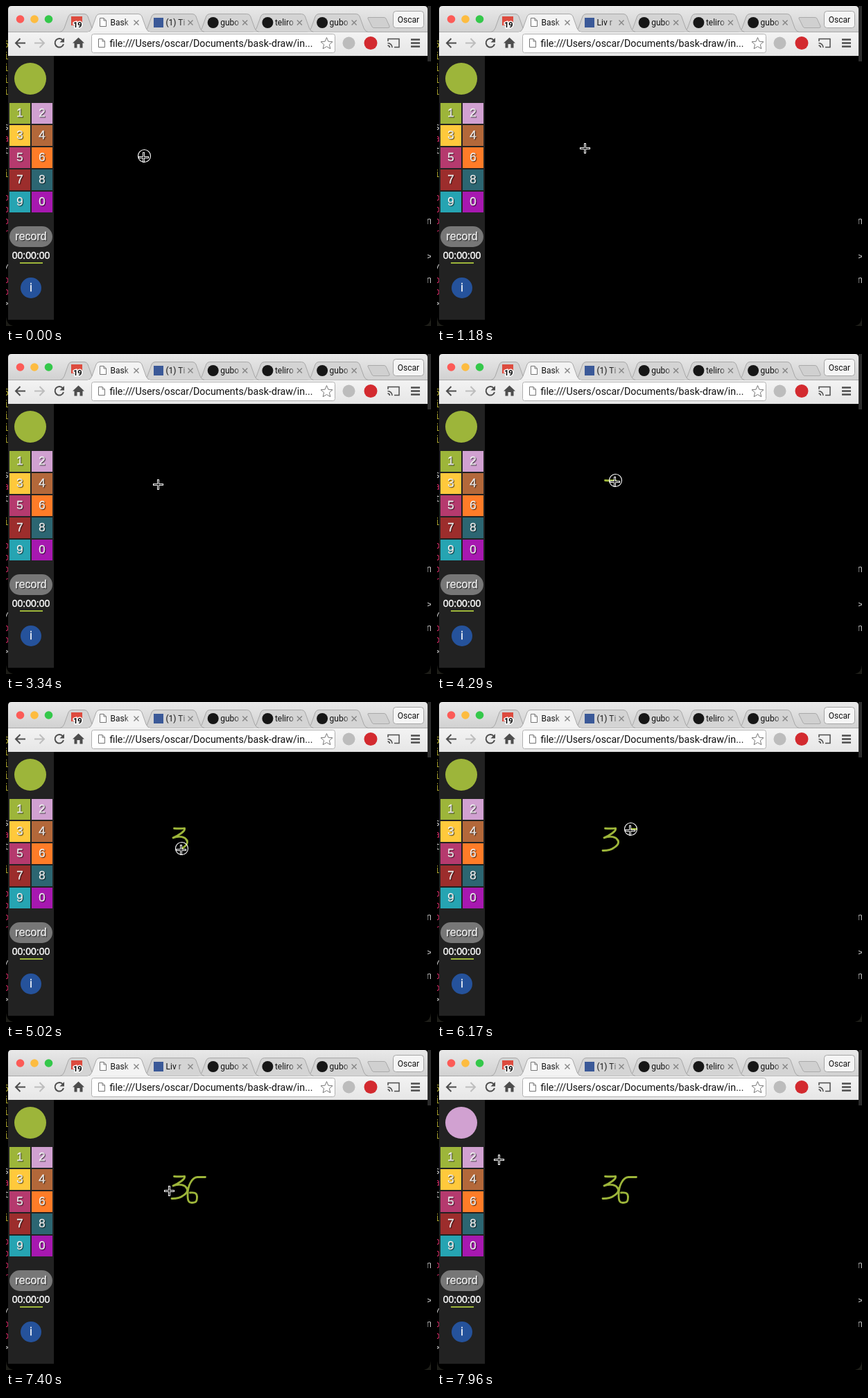
An HTML page for the animation above (7990 ms loop, 613 px wide and 462 px high).

```html
<!DOCTYPE html>
<html lang="en">
<head>
<meta charset="utf-8">
<title>Drawing board</title>
<style>
  html, body { margin: 0; width: 100%; height: 100%; overflow: hidden; background: #000; }
  svg { display: block; width: 613px; height: 462px; }
  text { font-family: Roboto, "Open Sans", sans-serif; }
  .title { font-size: 12px; fill: url(#fade); }
  .side text { font-family: "Liberation Sans", Arial, sans-serif; fill: #fff; stroke: #fff; stroke-width: .4; text-anchor: middle; }
  .shade { text-shadow: 1px 1px 1px rgba(0, 0, 0, .6); }
  .code text { font: 14px "DejaVu Sans Mono", monospace; }
  .icon { fill: none; stroke: #4d4d4d; stroke-width: 2; }
</style>
</head>
<body>
<svg viewBox="0 0 613 462">
  <defs>
    <linearGradient id="bar" x2="0" y2="1"><stop stop-color="#e9e9e9"/><stop offset="1" stop-color="#d0d0d0"/></linearGradient>
    <linearGradient id="tool" x2="0" y2="1"><stop stop-color="#f3f3f3"/><stop offset="1" stop-color="#e6e6e6"/></linearGradient>
    <linearGradient id="fade"><stop offset=".7" stop-color="#111"/><stop offset="1" stop-color="#111" stop-opacity=".4"/></linearGradient>
    <clipPath id="edge"><path d="M0 40H3V453H0ZM608 80H613V453H608Z"/></clipPath>
    <path id="page" d="M.5 .5H6L9.500 4V12.500H.5ZM6 .5V4H9.500" fill="#fff" stroke="#757575"/>
  </defs>

  <g class="code" id="code" clip-path="url(#edge)"></g>
  <path d="M608 0H613V80H608Z" fill="#2c2c2c"/>
  <path d="M0 449Q1 460 10 462H0ZM613 449Q612 460 603 462H613Z" fill="#1d1d18"/>

  <!-- browser window -->
  <path d="M3 39V5Q3 0 8 0H603Q608 0 608 5V39Z" fill="url(#bar)"/>
  <circle cx="20.500" cy="19" r="5.800" fill="#fc5b57"/>
  <circle cx="41" cy="19" r="5.800" fill="#fdbc40"/>
  <circle cx="61.500" cy="19" r="5.800" fill="#34c84a"/>
  <path d="M3 37.500H608V72H3Z" fill="url(#tool)"/>
  <path d="M3 37.500H608" stroke="#a8a8a8"/>
  <g id="tabs"></g>
  <path d="M523 16.500H545Q547 16.500 548 18L553 29Q554 31.500 551 31.500H531Q529 31.500 528 30L522 18Q521.500 16.500 523 16.500Z" fill="#d0d0d0" stroke="#aaa"/>
  <rect x="94" y="15" width="16" height="13" fill="#dd4b3e"/>
  <text x="97" y="31" font-size="11" font-weight="700" stroke="#fff" stroke-width="3" paint-order="stroke">19</text>
  <use href="#page" x="135" y="17"/>
  <rect x="558.500" y="7.500" width="44" height="24" rx="4" fill="#f5f5f5" stroke="#a5a5a5"/>
  <text x="580.500" y="24" font-size="12" text-anchor="middle" fill="#111">Oscar</text>

  <!-- toolbar -->
  <path class="icon" d="M28 53.500H14.500M20.500 47L14 53.500L20.500 60"/>
  <path class="icon" d="M41 53.500H54.500M48.500 47L55 53.500L48.500 60" style="stroke:#bdbdbd"/>
  <path class="icon" d="M82 49.500A6.300 6.300 0 1 0 83 55"/>
  <path d="M84 46V52.500H77.500Z" fill="#4d4d4d"/>
  <path d="M104.500 45.500L113 53.500H110.500V60.500H106.500V55H102.500V60.500H98.500V53.500H96Z" fill="#4d4d4d"/>
  <rect x="123.500" y="40.500" width="351" height="27" rx="3" fill="#fff" stroke="#b0b0b0"/>
  <use href="#page" x="133" y="47"/>
  <text x="149.500" y="59" font-size="14.250" fill="#111">file:///Users/oscar/Documents/bask-draw/in...</text>
  <path d="M462.500 45.500L464.900 51.200L471 51.700L466.400 55.700L467.800 61.700L462.500 58.500L457.200 61.700L458.600 55.700L454 51.700L460.100 51.200Z" fill="#fff" stroke="#777"/>
  <circle cx="494.500" cy="53.500" r="9" fill="#bcbcbc"/>
  <circle cx="526" cy="53.500" r="9.500" fill="#d32a2f"/>
  <path class="icon" d="M551 51V47.500H567V59.500H560M550.500 53.500A6.500 6.500 0 0 1 557 60M550.500 57A3.200 3.200 0 0 1 553.500 60" style="stroke-width:1.500"/>
  <path class="icon" d="M584 48.500H597M584 53.500H597M584 58.500H597" style="stroke-width:2.500"/>

  <!-- drawing board -->
  <path d="M3 72H608V453H3Z"/>
  <g class="side">
    <path d="M3 72H69V453H3Z" fill="#222"/>
    <circle id="badge" cx="35" cy="105" r="23"/>
    <g id="swatches"></g>
    <rect x="5" y="318" width="62" height="30" rx="15" fill="#777"/>
    <text class="shade" x="36" y="338" font-size="16">record</text>
    <text x="36" y="365" font-size="14">00:00:00</text>
    <path d="M20 371H53" stroke="#9db53a" stroke-width="2"/>
    <circle cx="36" cy="407" r="15" fill="#25529b"/>
    <text x="36" y="412" font-size="16">i</text>
  </g>
  <g id="ink" fill="none" stroke="#9db53a" stroke-width="2.800" stroke-linecap="round"></g>
  <g id="cursor" fill="none">
    <path d="M-1 -5.500V9.500M-8.500 2H6.500" stroke="#fff" stroke-width="3"/>
    <path d="M-1 -4.500V8.500M-7.500 2H5.500" stroke="#000"/>
    <circle id="ring" r="9" stroke="#fff" stroke-width="1.100"/>
  </g>
</svg>
<script>
const LOOP = 7990;
const GREEN = '#9db53a', PINK = '#d1a1d1';
const el = id => document.getElementById(id);

// one character per line of the editor behind, cut off by the window
function edgeText(x, lines) {
  const tint = c => /[5i]/.test(c) ? '#a6a02c' : /[aor]/.test(c) ? '#c2255c' : '#bbb';
  return [...lines].map((c, i) =>
    `<text x="${x}" y="${60 + 17 * i}" fill="${tint(c)}">${c === '>' ? '&gt;' : c}</text>`).join('');
}
el('code').innerHTML = edgeText(-4, '5iiii  sat i ooor  /oo>') + edgeText(606, ' '.repeat(15) + 'n  > n');

function tab(x, end, title, icon, active) {
  const side = `M${x} 37.500Q${x + 4} 37 ${x + 6} 32L${x + 12} 15Q${x + 13.5} 11.500 ${x + 17} 11.500` +
    `H${end - 17}Q${end - 13.5} 11.500 ${end - 12} 15L${end - 6} 32Q${end - 4} 37 ${end} 37.500`;
  return `<path d="${side}" fill="${active ? '#f3f3f3' : '#d4d4d4'}" stroke="#a8a8a8"/>` + icon +
    (active ? `<path d="M${x} 38H${end}" stroke="#f3f3f3" stroke-width="1.500"/>` : '') +
    (title && `<text class="title" x="${x + 32.5}" y="28">${title}</text>` +
      `<path d="M${end - 23.5} 20.500l7 7m0 -7l-7 7" stroke="#858585" stroke-width="1.400"/>`);
}
const back = ['(1) Ti', 'gubo', 'teliro', 'gubo'].map((title, i) => {
  const x = 198 + 78.7 * i;
  const icon = i ? `<circle cx="${x + 22}" cy="24" r="8" fill="#161616"/>`
    : `<rect x="${x + 15}" y="17" width="14" height="14" fill="#3b5998"/>`;
  return tab(x, x + 88, title, icon);
});
el('tabs').innerHTML = back.reverse().join('') + tab(78, 130, '', '') + tab(118, 208, 'Bask', '', true);
const chat = [...document.querySelectorAll('.title')].find(n => n.textContent.startsWith('('));

const colors = [GREEN, PINK, '#ffc93c', '#b3683a', '#b53a6e', '#ff7c28', '#9c2d2c', '#2c6672', '#26a4b2', '#a718b0'];
el('swatches').innerHTML = colors.map((c, i) => {
  const x = 5 + i % 2 * 32, y = 140 + (i >> 1) * 32;
  return `<rect x="${x}" y="${y}" width="30" height="30" fill="${c}"/>` +
    `<text class="shade" x="${x + 15}" y="${y + 20}" font-size="17">${(i + 1) % 10}</text>`;
}).join('');

// pointer moves: start, end, curve from where the last move stopped, whether it leaves ink
let spot = '199.5 216.5';
const moves = [
  [30, 140, 'L181 185.5'],
  [710, 1180, 'Q165 225 214.5 203.5'],
  [1180, 1790, 'C215 190 110 165 214 195'],
  [1940, 2080, 'L216 194'],
  [2260, 2440, 'Q170 190 190 212.5'],
  [2440, 2920, 'Q212 208 220 186.5'],
  [3340, 3490, 'L242.5 182.5'],
  [4090, 4290, 'Q250 183 257.5 182.5', true],
  [4290, 4860, 'C259 186 250 192 240 196.5C249 193 258 194 261 200', true],
  [4860, 5180, 'C264 206 253 215 239 214.5', true],
  [5440, 5900, 'Q262 196 287.5 183.5'],
  [6100, 6770, 'H276C268 184 262 196 262 209C262 217 263 220.5 268 220.5C274 220.5 275.5 219 275.5 212', true],
  [6770, 7030, 'C275.5 206 271 205.5 265.5 206', true],
  [7210, 7960, 'Q200 200 90.5 156.5']
].map(([start, end, curve, inked]) => {
  const path = document.createElementNS('http://www.w3.org/2000/svg', 'path');
  path.setAttribute('d', `M${spot}${curve}`);
  if (inked) el('ink').append(path);
  const length = path.getTotalLength();
  const stop = path.getPointAtLength(length);
  spot = `${stop.x} ${stop.y}`;
  return { start, end, path, length, inked };
});
const presses = [[0, 60], [3790, 5180], [5900, 7030]];
const flips = [900, 2000, 3400, 4200, 6450, 7500];
const pinkAt = 7700;

const clamp = u => Math.min(1, Math.max(0, u));
const smooth = u => u * u * (3 - 2 * u);

function progress(move, t) {
  const u = clamp((t - move.start) / (move.end - move.start));
  return move.length * (move.inked ? u : smooth(u));
}

function draw() {
  const t = performance.now() % LOOP;

  const move = moves.findLast(m => m.start <= t) || moves[0];
  const { x, y } = move.path.getPointAtLength(progress(move, t));
  el('cursor').setAttribute('transform', `translate(${Math.floor(x) + .5} ${Math.floor(y) + .5})`);
  el('ring').style.display = presses.some(([a, b]) => t >= a && t < b) ? '' : 'none';

  for (const m of moves.filter(m => m.inked)) {
    m.path.style.display = t > m.start ? '' : 'none';
    m.path.style.strokeDasharray = `${progress(m, t)} 999`;
  }

  chat.textContent = flips.filter(f => f <= t).length % 2 ? 'Liv r' : '(1) Ti';
  el('badge').setAttribute('fill', t < pinkAt ? GREEN : PINK);
  requestAnimationFrame(draw);
}
draw();
</script>
</body>
</html>
```
